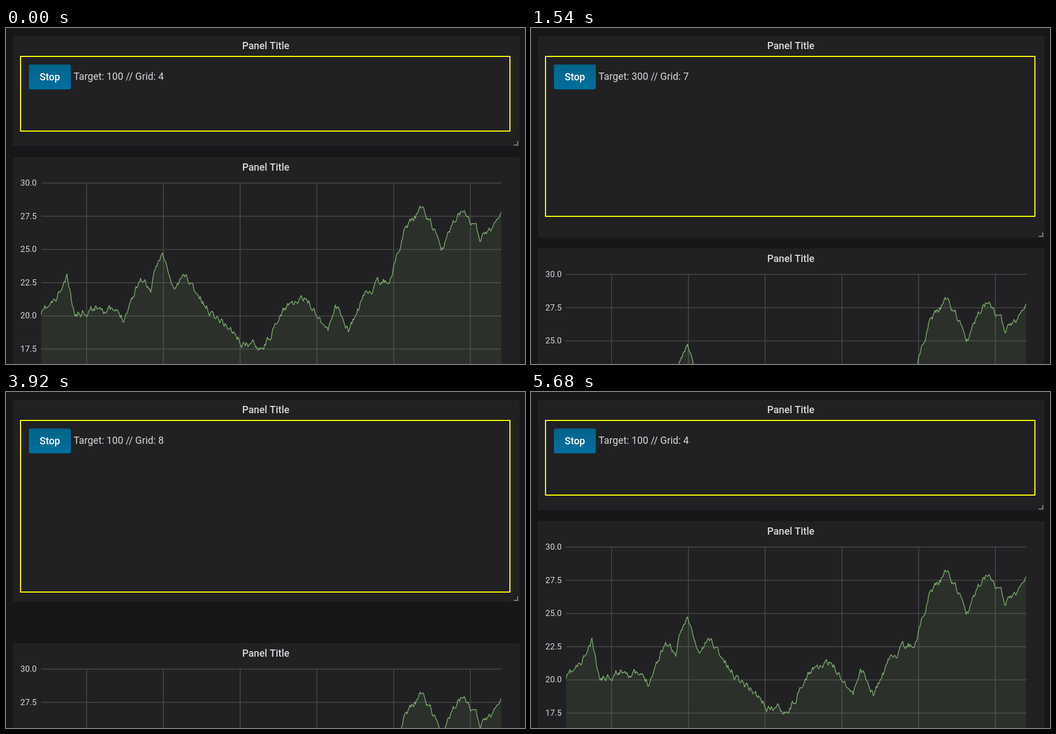
Recreate the animation shown at these times as an HTML page with a canvas. Size 929x603 px, loop 5.89 s.

```html
<!DOCTYPE html>
<html lang="en">
<head>
<meta charset="utf-8">
<title>Auto-sizing panel</title>
<style>
  html, body { margin: 0; width: 100%; height: 100%; overflow: hidden; background: #161719; }
  canvas { display: block; }
</style>
</head>
<body>
<canvas id="stage" width="929" height="603"></canvas>
<script>
const ctx = document.getElementById('stage').getContext('2d', { alpha: false });
const W = 929, H = 603, LOOP = 5890;
const SCALE = 1.365, CELL = 40, ROW = CELL * SCALE, CHROME = 52;
const TOP = 12.8, GAP = 18.4;
const LAG = 30, SLIDE = 200;
const FONT = 'Roboto, "Open Sans", sans-serif';

// Content height swings between 100 and 300: [ms, phase]
const pace = [
  [0, 0], [522, .403], [690, .743], [1540, 1.691], [2970, 3.29],
  [3920, 4.434], [5650, 2 * Math.PI], [LOOP, 2 * Math.PI]
];

// Main peaks and valleys of the series
const peaks = [
  [63, 514], [91, 487], [109, 449], [122, 514], [168, 497], [210, 520], [241, 447],
  [259, 470], [279, 399], [299, 470], [321, 443], [358, 502], [400, 537], [422, 566],
  [461, 568], [484, 535], [505, 494], [541, 490], [577, 541], [590, 495], [614, 544],
  [645, 474], [688, 449], [716, 352], [747, 322], [783, 398], [799, 352], [821, 319],
  [849, 378], [886, 339]
];

const lerp = (a, b, u) => a + (b - a) * u;

// Linear interpolation through sorted points
function along(points, x) {
  let i = 1;
  while (i < points.length - 1 && points[i][0] < x) i++;
  const [x0, y0] = points[i - 1], [x1, y1] = points[i];
  return lerp(y0, y1, (x - x0) / (x1 - x0));
}

let seed = 11;
const random = () => (seed = seed * 16807 % 2147483647) / 2147483647;

const series = [];
for (let x = 63, drift = 0; x <= 886; x += 1.646) {
  series.push([x, along(peaks, x) + drift - 231]);
  drift = drift * .72 + (random() - .5) * 12;
}

const contentHeight = t => 200 - 100 * Math.cos(along(pace, t));
const rowsFor = height => Math.ceil((height + CHROME) / CELL);

// Every change of the row count over one loop
const resizes = [{ at: -SLIDE, from: 4, to: 4 }];
for (let t = 0; t < LOOP; t++) {
  const from = resizes.at(-1).to, to = rowsFor(contentHeight(t) - 1e-6);
  if (to !== from) resizes.push({ at: t, from, to });
}
const resizeAt = t => resizes.findLast(r => r.at <= t);

const bezier = (a, b, s) => 3 * a * s * (1 - s) ** 2 + 3 * b * s * s * (1 - s) + s ** 3;

// CSS "ease"
function ease(u) {
  if (u >= 1) return 1;
  let lo = 0, hi = 1;
  for (let i = 0; i < 20; i++) {
    const mid = (lo + hi) / 2;
    if (bezier(.25, .25, mid) < u) lo = mid; else hi = mid;
  }
  return bezier(.1, 1, lo);
}

function text(str, x, y, size, weight = 400, align = 'left', color = '#d8d9da') {
  ctx.font = `${weight} ${size}px ${FONT}`;
  ctx.textAlign = align;
  ctx.fillStyle = color;
  ctx.fillText(str, x, y);
}

function box(x, y, w, h, fill) {
  ctx.beginPath();
  ctx.roundRect(x, y, w, h, 3);
  ctx.fillStyle = fill;
  ctx.fill();
}

function panel(y, h) {
  box(11, y - .5, 909, h + 1, '#141414');
  box(12, y + .5, 907.5, h - 1, '#212124');
  text('Panel Title', 465, y + 25, 17.74, 500, 'center');
}

function controls(height, bottom, label) {
  panel(13, bottom - 13);

  const end = Math.round(49.8 + height * SCALE);
  ctx.strokeStyle = '#ffff00';
  ctx.lineWidth = 2;
  ctx.strokeRect(26, 51, 876, end - 52);

  const blue = ctx.createLinearGradient(0, 65, 0, 110);
  blue.addColorStop(0, '#006488');
  blue.addColorStop(1, '#006fa0');
  box(41, 65.5, 75, 44.5, blue);
  text('Stop', 78.5, 94, 17.74, 500, 'center', '#fff');
  text(label, 121, 93, 17.74);

  ctx.fillStyle = '#7c7c7e';
  ctx.fillRect(909, bottom - 4, 8, 2);
  ctx.fillRect(915, bottom - 10, 2, 8);
}

function graph(y) {
  panel(y, 420);

  ctx.fillStyle = '#4b4b4d';
  for (let i = 0; i < 6; i++) {
    ctx.fillRect(63, y + 46.6 + i * 59.6, 824, 1.4);
    ctx.fillRect(143.6 + i * 137.4, y + 46.6, 1.4, H);
  }
  for (let i = 0; i < 6; i++) {
    text((30 - i * 2.5).toFixed(1), 55, y + 52 + i * 59.6, 15, 400, 'right');
  }

  const line = new Path2D();
  for (const [px, py] of series) line.lineTo(px, y + py);
  const area = new Path2D(line);
  area.lineTo(886, y + 420);
  area.lineTo(63, y + 420);
  ctx.fillStyle = 'rgba(126,178,109,.1)';
  ctx.fill(area);
  ctx.strokeStyle = '#7eb26d';
  ctx.lineWidth = 1.36;
  ctx.lineJoin = 'round';
  ctx.stroke(line);
}

function draw(t) {
  ctx.fillStyle = '#161719';
  ctx.fillRect(0, 0, W, H);

  // The panel grows at once; its label and the panel below follow
  const { to: rows } = resizeAt(t);
  const { at, from, to } = resizeAt(t - LAG);
  const slid = lerp(from, to, ease((t - LAG - at) / SLIDE));
  const label = `Target: ${to > from ? 300 : 100} // Grid: ${to}`;

  graph(Math.round(TOP + ROW * slid));
  controls(contentHeight(t), Math.round(TOP - GAP + ROW * rows), label);
}

function frame() {
  draw(performance.now() % LOOP);
  requestAnimationFrame(frame);
}
frame();
</script>
</body>
</html>
```
